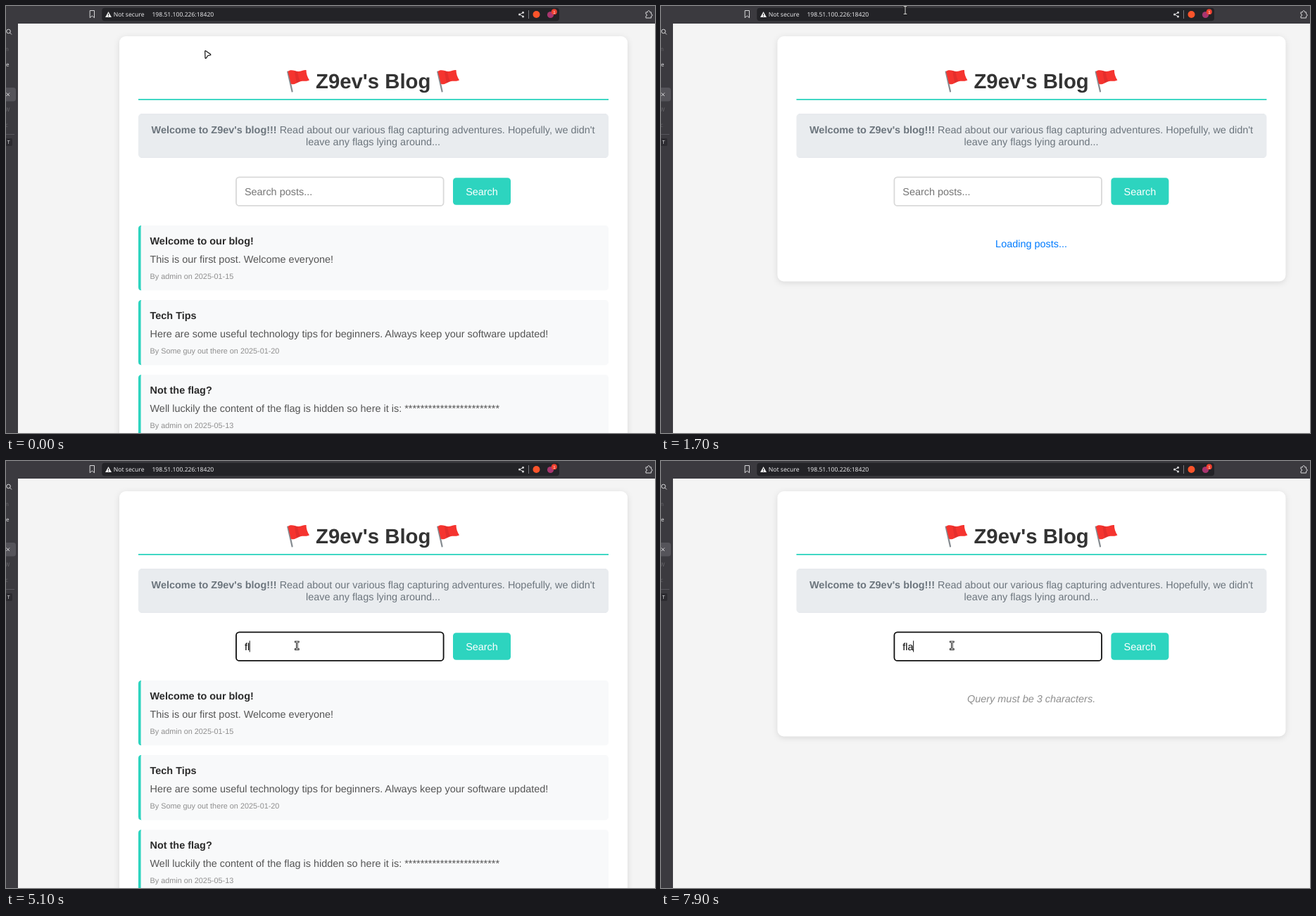
Animation, 922 px wide and 607 px high, one loop 8000 ms. Source, as an HTML page:

```html
<!DOCTYPE html>
<html lang="en">
<head>
<meta charset="utf-8">
<title>Blog search</title>
<style>
html, body { margin: 0; width: 100%; height: 100%; overflow: hidden; background: #f4f4f4; }
svg { display: block; width: 922px; height: 607px; text-rendering: geometricPrecision; }
text { font: 14.45px "Liberation Sans", Arial, sans-serif; white-space: pre; }
.mid { text-anchor: middle; }
.bold { font-weight: bold; }
.title { font-size: 29.3px; font-weight: bold; fill: #333; }
.intro { fill: #6c757d; }
.head { font-weight: bold; fill: #2b2b2b; }
.copy { fill: #555; }
.date { font-size: 10.85px; fill: #8e8e8e; }
.ui { font: 8.6px "Noto Sans", sans-serif; fill: #e6e6e8; }
.side { font: 8px "Noto Sans", sans-serif; fill: #e0e0e2; }
.line { fill: none; stroke: #d8d8da; stroke-width: 1; stroke-linejoin: round; }
.arabic { font: 11px "DejaVu Sans", sans-serif; }
#card { filter: drop-shadow(0 2px 4.5px rgba(0, 0, 0, .11)); }
</style>
</head>
<body>
<svg viewBox="0 0 922 607">
  <defs>
    <g id="flag">
      <path d="M1.3 3.5 7.6 31.5" stroke="#858b90" stroke-width="2.2" stroke-linecap="round"/>
      <path d="M1.5 3C7-1 12 3.5 17 3S24 .5 27.500 1C27.500 6 29 11 32 15.500C27 18 23 15.500 18 17.500S10 23 5.700 20.500Z" fill="#f5342f"/>
      <path d="M15 3.200Q16 11 19 17.200L14 19.500Q12 11 11 2.500Z" fill="#d92b2b" opacity=".6"/>
    </g>
  </defs>

  <rect width="922" height="607" fill="#f4f4f4"/>
  <g id="page">
    <rect id="card" x="161" y="43" width="722" rx="9" fill="#fff"/>
    <use href="#flag" x="399" y="90"/>
    <use href="#flag" x="612" y="90"/>
    <text class="title mid" x="521.7" y="116.500">Z9ev's Blog</text>
    <rect x="188" y="132" width="668" height="1.8" fill="#2dd4bf"/>
    <rect x="188" y="153.500" width="668" height="62" rx="4.5" fill="#e9ecef"/>
    <path d="M191 153.800h662M191 215.200h662" stroke="#dfe3e7" stroke-width=".8"/>
    <text class="intro mid" x="521.6" y="181"><tspan class="bold">Welcome to Z9ev's blog!!!</tspan> Read about our various flag capturing adventures. Hopefully, we didn't</text>
    <text class="intro mid" x="521.6" y="198">leave any flags lying around...</text>
    <rect id="field" x="327" y="243.300" width="294.600" height="40.600" rx="4.5" fill="#fff" stroke-width="1.8"/>
    <text id="typed" x="338.900" y="268.500"></text>
    <rect id="caret" y="255.500" width="1" height="16" fill="#111"/>
    <rect x="635" y="244.300" width="82" height="38.500" rx="4.5" fill="#2dd4bf"/>
    <text class="mid" x="676" y="268.500" fill="#fff">Search</text>
    <g id="posts"></g>
    <text id="note" class="mid" x="521.700" y="343"></text>
  </g>

  <path d="M0 0H922V25H17V607H0Z" fill="#3b3a3f"/>
  <rect id="bar" x="136.300" y="2.800" width="649.700" height="18.400" rx="4" fill="#232327" stroke-width="1.5"/>
  <path class="line" d="M119.200 6.500h6.300v10.200l-3.150-2.700-3.150 2.700z"/>
  <path d="M145.500 8 150 16H141Z" fill="#eee"/>
  <path d="M145.500 10.800v2.400M145.500 14v1" stroke="#232327"/>
  <text class="ui" x="152.800" y="15.200">Not secure</text>
  <rect id="mark" x="207" y="6" width="88" height="12" fill="#b9c2f7"/>
  <text id="address" class="ui" x="207.400" y="15.200">198.51.100.226:18420</text>
  <path class="line" d="M734.500 9.500 729.500 12 734.500 14.800"/>
  <g fill="#d8d8da"><circle cx="734.500" cy="9.300" r="1.500"/><circle cx="729.500" cy="12" r="1.500"/><circle cx="734.500" cy="14.900" r="1.500"/></g>
  <path d="M742.500 6v12" stroke="#77777c"/>
  <circle cx="753.500" cy="12" r="5" fill="#fb542b"/>
  <circle cx="773.500" cy="12.500" r="4.600" fill="#a8356f"/>
  <circle cx="778.800" cy="8.300" r="4" fill="#f0402f"/>
  <text class="mid" x="778.800" y="10.500" fill="#fff" style="font-size:6px">1</text>
  <path class="line" d="M909 8.800h2.600a1.600 1.600 0 1 1 3 0h2v2.700a1.500 1.500 0 1 1 0 3v2.500h-7.600v-2.600a1.500 1.500 0 1 0 0-3z"/>

  <g id="side">
    <circle class="line" cx="3.500" cy="36" r="2.800"/>
    <path class="line" d="M5.500 38 8 40.500"/>
    <text class="side" x="-1" y="63.500" opacity=".25">n</text>
    <text class="side" x="0" y="85.500">e</text>
    <path d="M0 116H10.500a3.500 3.500 0 0 1 3.500 3.500V132a3.500 3.500 0 0 1-3.500 3.500H0Z" fill="#55545a"/>
    <path class="line" d="M.5 123.500 5 128M5 123.500.5 128"/>
    <text class="side" x="-2" y="150" opacity=".25">W</text>
    <text class="side" x="-1" y="172" opacity=".25">c</text>
    <path d="M0 182.500H12" stroke="#57565c"/>
    <rect x="-2" y="188" width="11" height="11" rx="2" fill="#2c2b30"/>
    <text class="side mid" x="3.800" y="196" style="font-size:7px">T</text>
  </g>

  <g id="cursor">
    <path id="arrow" d="M.7 1.300Q.7.300 1.700.700L8.500 5.500Q9.300 6.500 8.300 6.800L4.900 7.500 2.300 11Q1.300 12 1 10.800Z" fill="#fff" stroke="#111" stroke-width="1.200"/>
    <g id="beam" fill="none">
      <path d="M-3.300-5.300h6.600M-3.300 5.300h6.600M0-5.300v10.600" stroke="#111" stroke-width="2.600"/>
      <path d="M-2.500-5.300h5M-2.500 5.300h5M0-5.300v10.600" stroke="#fff" stroke-width=".9"/>
    </g>
  </g>
</svg>

<script>
const $ = id => document.getElementById(id);
const set = (id, attrs) => { for (const k in attrs) $(id).setAttribute(k, attrs[k]); };
const show = (id, on) => set(id, { visibility: on ? 'visible' : 'hidden' });

const posts = [
  ['Welcome to our blog!', 'This is our first post. Welcome everyone!', 'By admin on 2025-01-15'],
  ['Tech Tips', 'Here are some useful technology tips for beginners. Always keep your software updated!', 'By Some guy out there on 2025-01-20'],
  ['Not the flag?', 'Well luckily the content of the flag is hidden so here it is: ' + '*'.repeat(24), 'By admin on 2025-05-13']
];
$('posts').innerHTML = posts.map(([head, copy, date], i) => `
  <g transform="translate(188 ${312 + i * 106.1})">
    <rect width="668" height="92.300" rx="4.5" fill="#f8f9fa"/>
    <path d="M4.500 0Q3.600 0 3.600 4V88Q3.600 92.300 4.500 92.300Q0 92.300 0 87.800V4.500Q0 0 4.500 0Z" fill="#2dd4bf"/>
    <text class="head" x="16.500" y="27">${head}</text>
    <text class="copy" x="16.500" y="53.300">${copy}</text>
    <text class="date" x="16.500" y="76">${date}</text>
  </g>`).join('');

// Each track holds [start ms, value] pairs.
const slip = 'بمشل';
const words = [
  [0, ''], [3600, slip.slice(0, 1)], [3700, slip.slice(0, 2)], [3800, slip.slice(0, 3)], [3900, slip],
  [4500, slip.slice(0, 3)], [4600, slip.slice(0, 2)], [4800, slip.slice(0, 1)], [4900, ''],
  [5000, 'f'], [5100, 'fl'], [5400, 'fla'], [5500, 'flag'],
  [6800, 'fl'], [6900, ''], [7700, 'f'], [7900, 'fla']
];
const notes = [[0, ''], [1700, 'Loading posts...'], [2200, ''], [5700, 'Searching...'], [5900, 'Query must be 3 characters.']];
const carets = [[0, false], [3000, true], [6200, false], [6800, true], [7300, false], [7700, true]];
const moves = [[0, 282, 63], [600, 347, 6], [2100, 347, 6], [2500, 402.500, 233.500], [2600, 402.500, 233.500], [2800, 413.300, 262.300]];

const at = (track, t) => track.findLast(([start]) => start <= t)[1];

function pointer(t) {
  const i = moves.findLastIndex(([start]) => start <= t);
  const [t0, x0, y0] = moves[i];
  const [t1, x1, y1] = moves[i + 1] || [t0 + 1, x0, y0];
  const p = (t - t0) / (t1 - t0);
  const e = p * p * (3 - 2 * p);
  return [x0 + (x1 - x0) * e, y0 + (y1 - y0) * e];
}

function draw(now) {
  const t = Math.floor(now % 8000 / 100) * 100;
  const note = at(notes, t), word = at(words, t);
  const inBar = t >= 700 && t < 1300, selected = t >= 900 && t < 1300;
  const focused = t >= 3000;

  set('bar', { stroke: inBar ? '#5f5bd8' : 'none' });
  show('mark', selected);
  $('address').style.fill = selected ? '#202033' : '';

  // The page moves right when it is short enough to lose its scrollbar.
  set('page', { transform: `translate(${note ? 4.4 : 0} 0)` });
  set('card', { height: note ? 348.500 : 620 });
  show('posts', !note);
  $('note').textContent = note;
  const italic = note.startsWith('Query');
  $('note').style.fontStyle = italic ? 'italic' : 'normal';
  set('note', { fill: italic ? '#8e8e8e' : '#007bff' });

  set('field', { stroke: focused ? '#101010' : '#d9d9d9' });
  $('typed').textContent = word || 'Search posts...';
  set('typed', { fill: word ? '#000' : '#757575', class: word > 'z' ? 'arabic' : '' });
  set('caret', { x: 338.900 + (word ? $('typed').getComputedTextLength() : 0) - .4 });
  show('caret', at(carets, t));

  const [x, y] = pointer(t);
  const beam = y < 22 || t >= 2700;
  set('cursor', { transform: `translate(${x} ${y})` });
  show('arrow', !beam);
  show('beam', beam);
}

function loop() {
  draw(performance.now());
  requestAnimationFrame(loop);
}
loop();
</script>
</body>
</html>
```
